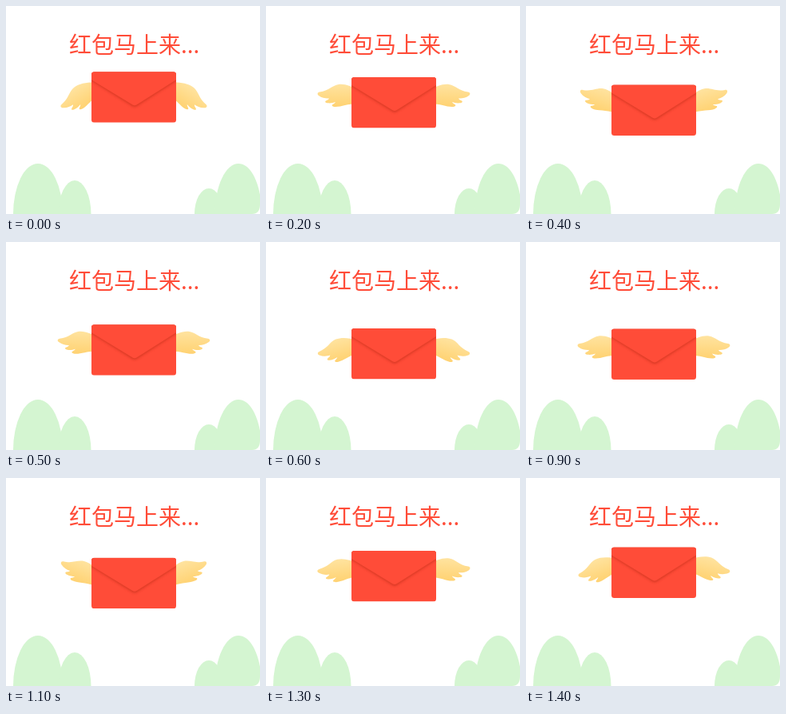
These frames come from a looping animation (318 by 260 pixels, 1500 ms). An HTML page:

```html
<!DOCTYPE html>
<html lang="zh">
<head>
<meta charset="utf-8">
<title>红包马上来</title>
<style>
  html, body { margin: 0; width: 100%; height: 100%; overflow: hidden; background: #fff; }
  svg { display: block; width: 318px; height: 260px; }
  text { font: 28px "Noto Sans CJK SC", "Noto Sans CJK", sans-serif; fill: #ff4c38; }
</style>
</head>
<body>
<svg viewBox="0 0 318 260">
  <defs>
    <linearGradient id="gold" x1="0" y1="0" x2="0" y2="1">
      <stop offset="0" stop-color="#ffe39f"/>
      <stop offset="1" stop-color="#ffd272"/>
    </linearGradient>
    <filter id="blur" x="-10%" y="-20%" width="120%" height="150%">
      <feGaussianBlur stdDeviation="1.6"/>
    </filter>
    <clipPath id="card"><rect width="106" height="63.5" rx="3.5"/></clipPath>
    <!-- Hinge at the origin, feathers pointing left -->
    <path id="wing" fill="url(#gold)" d="M8 -9 C1 -13 -8 -17 -16 -16 C-25 -14.500 -28 -8 -40 -6.500
      C-43 -6 -43 -3.500 -41 -2 C-37 1 -32 1.800 -28 1.500 C-29 3.500 -31 4 -32 4.500
      C-34 6 -32 7 -30 7.300 C-26 7.800 -23 7 -20 6 C-21 8 -23 8.500 -24 9.500
      C-25 11 -23 11.800 -21 12 C-13 12.500 -6 8 8 8 Z"/>
  </defs>

  <g fill="#d4f5d1">
    <ellipse cx="40" cy="260" rx="31" ry="63"/>
    <ellipse cx="86" cy="260" rx="20.500" ry="42"/>
    <ellipse cx="254" cy="260" rx="18" ry="32"/>
    <path d="M261.500 260 C261.500 225 275 197 291 197 C304 197 314 214 318 236 V248 Q318 260 308 260 Z"/>
  </g>

  <text x="79" y="58.500">红包马上来...</text>

  <g id="flyer">
    <g transform="translate(0 25)"><use href="#wing" id="left"/></g>
    <g transform="translate(106 25) scale(-1 1)"><use href="#wing" id="right"/></g>
    <g clip-path="url(#card)">
      <rect width="106" height="63.500" fill="#ff4c38"/>
      <path d="M-4 9 L51 43 Q54 45 57 43 L110 9 V0 H-4 Z" fill="#c8301f" opacity=".65" filter="url(#blur)"/>
      <path d="M0 10 L51.500 41.300 Q54 42.800 56.500 41.300 L106 10 V0 H0 Z" fill="#ff4c38"/>
    </g>
  </g>
</svg>
<script>
  const LOOP = 1500, STEP = 100;
  const height = [[0, 82.2], [30, 81], [750, 115], [1500, 82.2]];
  const flap = [[0, -32], [200, 0], [300, 14], [400, 18], [600, -15], [700, -32],
                [900, 0], [1000, 14], [1100, 21]];
  const leftFlap = [...flap, [1400, -20], [1500, -32]];
  const rightFlap = [...flap, [1400, -13], [1500, -32]];
  const [flyer, left, right] = ['flyer', 'left', 'right'].map(id => document.getElementById(id));

  // Linear interpolation through [time, value] points
  function at(points, t) {
    const i = points.findIndex(p => p[0] > t);
    const [t0, v0] = points[i - 1], [t1, v1] = points[i];
    return v0 + (v1 - v0) * (t - t0) / (t1 - t0);
  }

  function draw(now) {
    const t = Math.floor((now % LOOP) / STEP) * STEP;
    flyer.setAttribute('transform', `translate(107 ${at(height, t)})`);
    left.setAttribute('transform', `rotate(${at(leftFlap, t)})`);
    right.setAttribute('transform', `rotate(${at(rightFlap, t)})`);
  }

  function tick() {
    draw(performance.now());
    requestAnimationFrame(tick);
  }
  tick();
</script>
</body>
</html>
```
